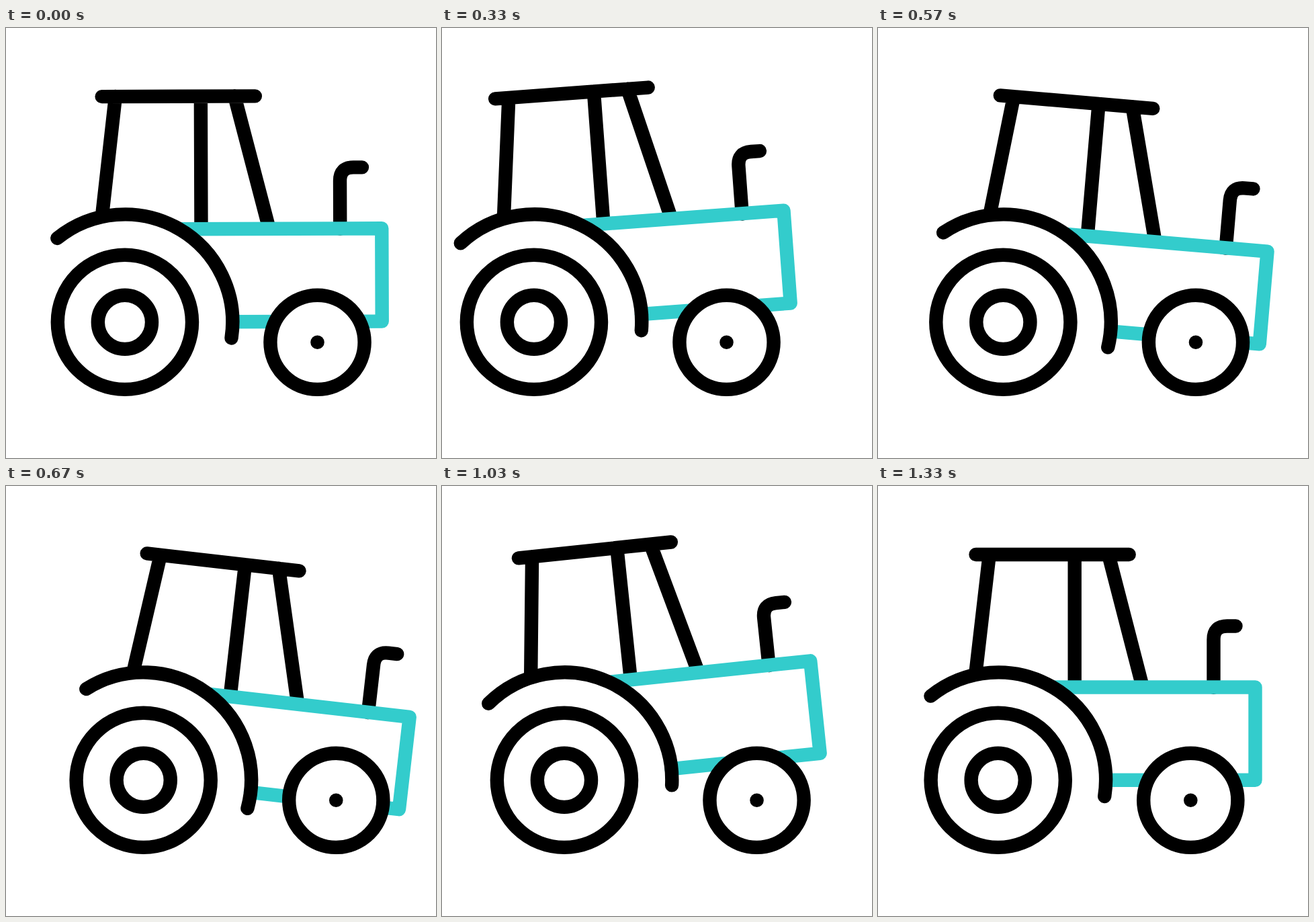
Write an HTML page that moves like this. It is 640 px wide and 640 px high and loops after 1670 ms.

```html
<!DOCTYPE html>
<html lang="en">
<head>
<meta charset="utf-8">
<title>Tractor</title>
<style>
  html, body { margin: 0; height: 100%; overflow: hidden; background: #fff; }
  svg { display: block; width: 100vw; height: 100vh; }
  .line { fill: none; stroke: #000; stroke-width: 20.4; stroke-linecap: round; stroke-linejoin: round; }
  .teal { stroke: #3cc; }
</style>
</head>
<body>
<svg viewBox="0 0 640 640">
  <g id="tractor" class="line">
    <g id="body">
      <path d="M145.5 102H373.7M165.8 102L145.2 280M292.7 102V298M343 102L393.6 298"/>
      <path d="M499.5 299.8V228.5Q499.5 208.5 519.5 208.5H532.5"/>
      <path class="teal" d="M264 299.5H561.5V437.8H339"/>
      <path d="M78.5 312.6A160.3 160.3 0 0 1 337.2 462"/>
    </g>
    <circle cx="178.7" cy="437.8" r="100.1"/>
    <circle cx="178.7" cy="437.8" r="40.1"/>
    <circle cx="465.3" cy="467.8" r="70.1" fill="#fff"/>
    <circle cx="465.3" cy="467.8" r="10.3" fill="#000" stroke="none"/>
  </g>
</svg>
<script>
  const LOOP = 1670, STEP = 33.33;
  const tractor = document.getElementById('tractor');
  const body = document.getElementById('body');

  // [step, value] keys, eased in and out between neighbours
  const shift = [[-1.25, 0], [8.95, -43.2], [21.5, 28.8], [22.3, 28.8], [33.3, 0]];
  const tilt = [[-1.25, 0], [9, -4.5], [19.6, 6.55], [31.6, -6.08], [40, 0]];

  function valueAt(keys, step) {
    const i = keys.findIndex(key => key[0] > step);
    if (i < 0) return keys[keys.length - 1][1];
    const [start, from] = keys[i - 1], [end, to] = keys[i];
    const u = (step - start) / (end - start);
    return from + (to - from) * u * u * (3 - 2 * u);
  }

  function draw(now) {
    const step = Math.floor((now % LOOP + 4) / STEP);
    tractor.setAttribute('transform', `translate(${valueAt(shift, step)} 0)`);
    body.setAttribute('transform', `rotate(${valueAt(tilt, step)} 178.7 437.8)`);
    requestAnimationFrame(draw);
  }

  draw(0);
</script>
</body>
</html>
```
